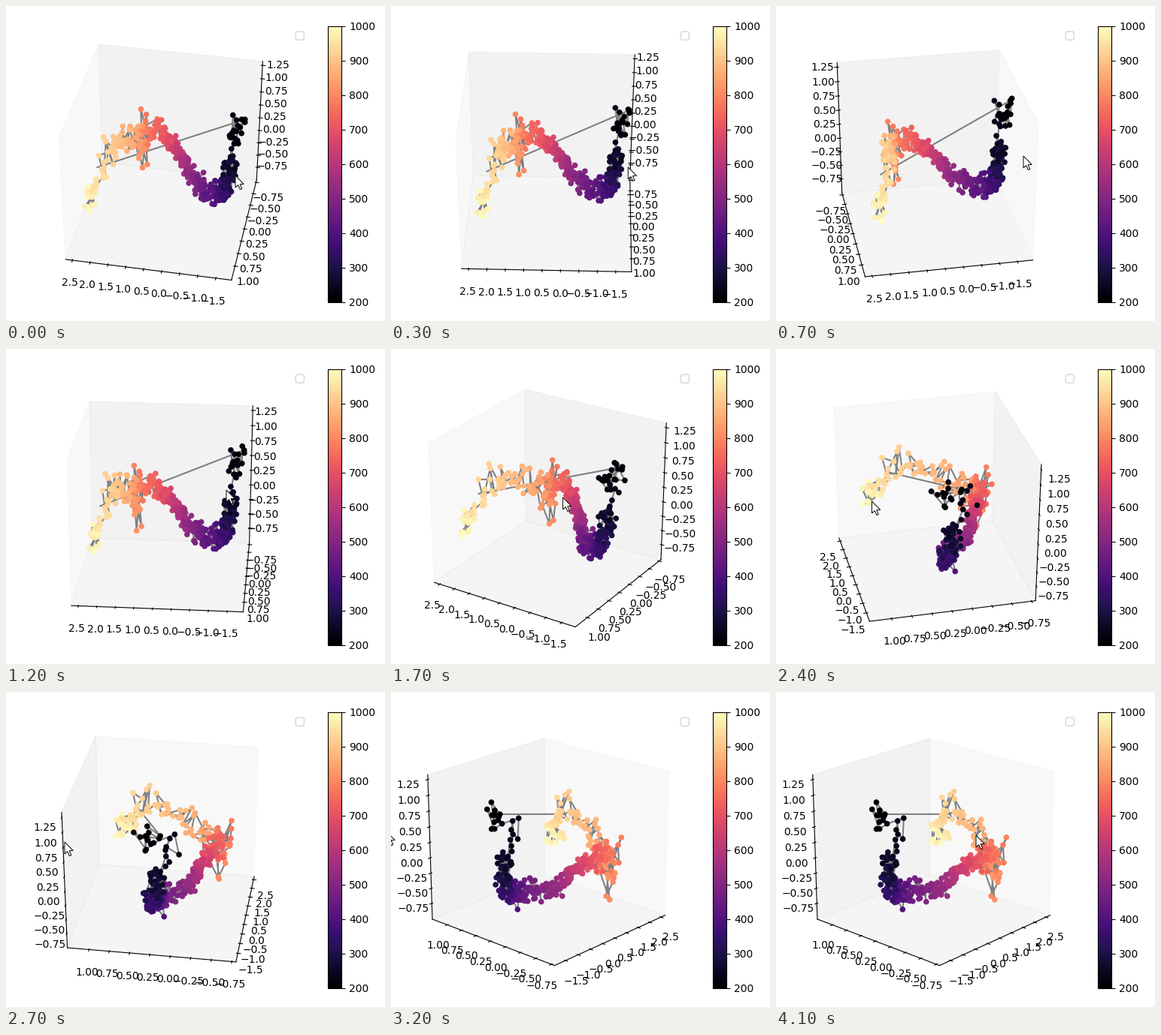
Animation of 504x420 px, one loop 4.2 s. Source, as a matplotlib script:

```python
import numpy as np
import matplotlib.pyplot as plt
from matplotlib.animation import FuncAnimation
from matplotlib.cm import ScalarMappable
from matplotlib.colors import Normalize
from matplotlib.patches import FancyBboxPatch, Polygon
from mpl_toolkits.mplot3d import Axes3D  # noqa: F401

W, H, DPI = 504, 420, 100
FRAMES, INTERVAL = 42, 100

# Axis limits; the box they span has sides of 25/24
LIMITS = np.array([(-1.93, 2.69), (-0.80, 1.27), (-1.015, 1.325)])
SIDE = 25 / 24

# Bends of the data's path: value, then x, y, z in box units
PATH = np.array([
    (200, -.45, .00, .44),
    (220, -.44, .05, .25),
    (230, -.43, -.13, .31),
    (245, -.41, -.03, .05),
    (350, -.40, .01, -.19),
    (440, -.27, -.01, -.26),
    (540, -.13, -.17, -.20),
    (700, .03, -.29, -.02),
    (780, .19, -.35, .00),
    (815, .22, -.31, -.20),
    (850, .24, -.21, .00),
    (920, .31, .14, .16),
    (960, .38, .32, -.07),
    (1000, .40, .35, -.13),
])

# Turns of the drag: step, azimuth, elevation, pointer x, pointer y
DRAG = np.array([
    (0, 101.0, 39.5, 305, 226),
    (7, 79.5, 31.0, 329, 200),
    (12, 94.8, 24.0, 293, 188),
    (21, 145.1, 30.3, 177, 206),
    (27, 188.8, 31.8, 78, 200),
    (32, 222.5, 22.0, -6, 186),
])
BACK = 40  # step at which the pointer returns from the left

ARROW = np.array([(0, 0), (0, 16), (3.7, 12.6), (6.4, 18.6),
                  (8.8, 17.5), (6.2, 11.7), (11.2, 11.4)])


def lookup(keys, at):
    """Interpolate every column of the keys over the first one."""
    return np.array([np.interp(at, keys[:, 0], col) for col in keys.T[1:]])


def bump(v, mid, width):
    return np.exp(-((v - mid) / width) ** 2)


def to_data(box):
    """Turn box units into data coordinates."""
    mid = LIMITS.mean(axis=1)
    size = np.ptp(LIMITS, axis=1)
    return mid[:, None] + box * size[:, None] / SIDE


def cloud(values, seed=8):
    """Noisy path: calm around 600, tall around 800."""
    rng = np.random.default_rng(seed)
    noise = np.clip(rng.normal(size=(3, values.size)), -2, 2)
    spread = np.outer((.021, .033, .052), 1 - .5 * bump(values, 610, 90))
    spread[2] += .045 * bump(values, 805, 25)
    return to_data(lookup(PATH, values) + noise * spread)


def rect(x, y, w, h):
    """Pixel box, measured from the top left, in figure fractions."""
    return [x / W, 1 - (y + h) / H, w / W, h / H]


def pointer_tip(i):
    if i < BACK:
        return lookup(DRAG, i)[2:] - (10 * max(0, i - DRAG[-1, 0]), 0)
    return np.array([140 + 126 * (i - BACK), 196 - 5 * (i - BACK)])


fig = plt.figure(figsize=(W / DPI, H / DPI), dpi=DPI, facecolor="white")

# 3D plot, stretched to its frame
ax = fig.add_axes(rect(6.5, 27, 396.8, 368), projection="3d")
ax.apply_aspect = lambda position=None: None
ax.set_box_aspect((1, 1, 1), zoom=np.sqrt(3) / 1.8294640721620434)
ax.grid(False)
ax.set(xlim=LIMITS[0], ylim=LIMITS[1], zlim=LIMITS[2])
ax.set_xticks(np.arange(-1.5, 2.6, 0.5))
ax.set_yticks(np.arange(-0.75, 1.1, 0.25))
ax.set_zticks(np.arange(-0.75, 1.3, 0.25))

values = np.linspace(200, 1000, 400)
points = cloud(values)
start = to_data(np.array([[.37], [.23], [.07]]))

scale = ScalarMappable(Normalize(200, 1000), "magma")
ax.plot(*np.hstack([start, points]), color="gray", lw=1.5)
ax.scatter(*points, c=scale.to_rgba(values), s=20, depthshade=False)

cax = fig.add_axes(rect(428, 27, 18.4, 368))
fig.colorbar(scale, cax=cax)

# Flat layer in pixels for the empty legend and the pointer
top = fig.add_axes([0, 0, 1, 1], zorder=5)
top.set(xlim=(0, W), ylim=(H, 0))
top.axis("off")
top.add_patch(FancyBboxPatch(
    (387.6, 36.5), 6.4, 6.4, boxstyle="round,pad=2.4,rounding_size=2.6",
    fc="white", ec="0.8", lw=1, alpha=0.8))
pointer = top.add_patch(Polygon(ARROW, fc="white", ec="black", lw=0.7))


def update(i):
    azim, elev = lookup(DRAG, i)[:2]
    ax.view_init(elev=elev, azim=azim)
    pointer.set_xy(ARROW + pointer_tip(i))
    return [pointer]


anim = FuncAnimation(fig, update, frames=FRAMES, interval=INTERVAL,
                     repeat=True, repeat_delay=0, blit=False)
plt.show()
```
